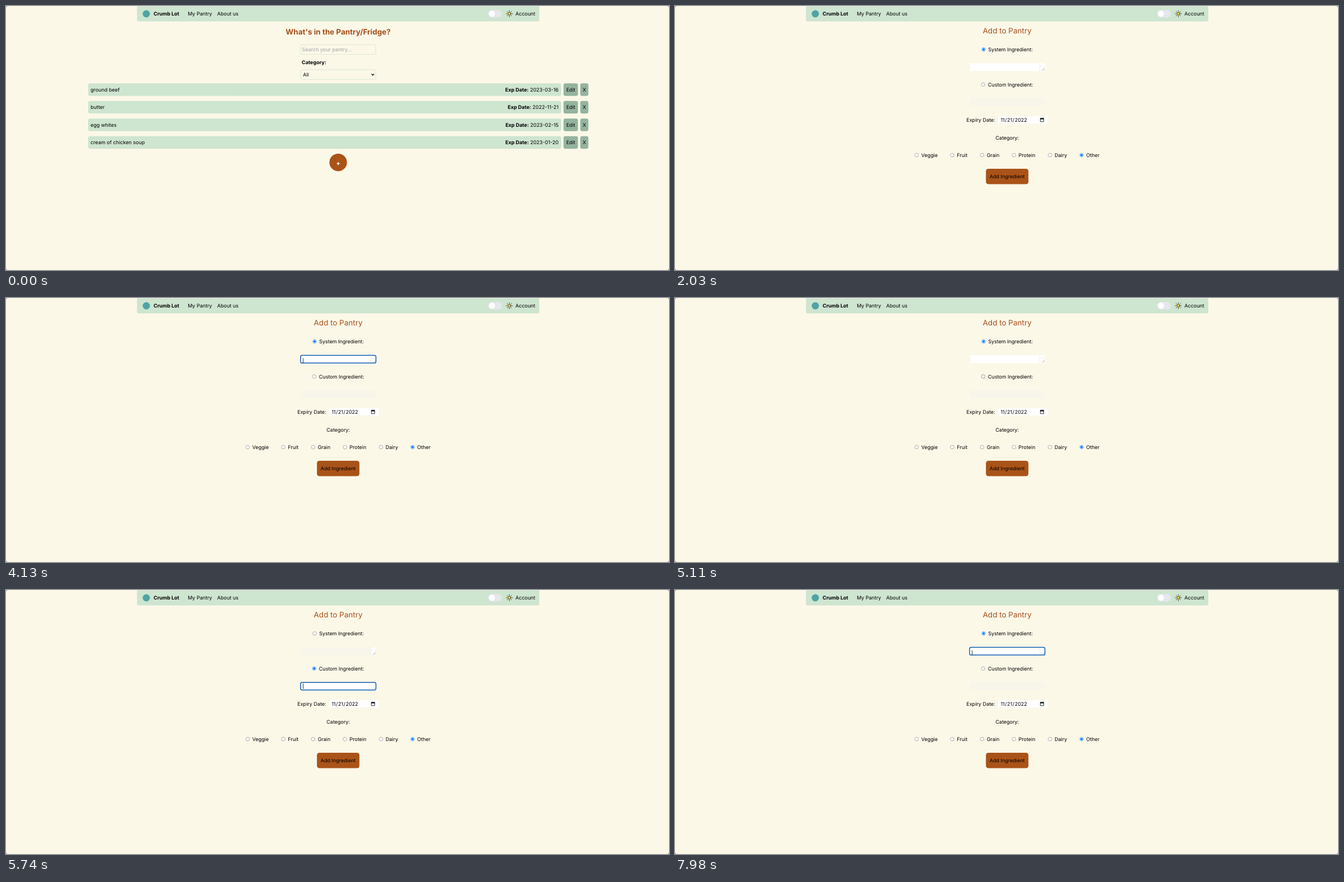
Animation, 1186 px wide and 472 px high, one loop 8000 ms. Source, as an HTML page:

```html
<!DOCTYPE html>
<html lang="en">
<head>
<meta charset="utf-8">
<title>Pantry</title>
<style>
  html, body { margin: 0; width: 100%; height: 100%; overflow: hidden; background: #fcf8e8; }
  svg { display: block; width: 1186px; height: 472px; }
  text { font: 400 9px Inter, sans-serif; text-rendering: geometricPrecision; white-space: pre; }
  .b { font-weight: 700; }
  .mid { text-anchor: middle; }
  .end { text-anchor: end; }
  .title { font-size: 13.5px; fill: #a64f1d; }
  .hint { fill: #9fa3a8; }
  .plus { font-size: 11.25px; fill: #fff; }
  .mint { fill: #cee5d0; }
  .sage { fill: #94b49f; }
  .rust { fill: #aa5319; }
  .field { fill: none; stroke: #cee5d0; }
  .off { fill: #f8f5ea; }
  .white { fill: #fff; }
  .ring { fill: #fff; stroke: #105db5; stroke-width: 1.5; }
  .line { fill: none; stroke: #000; }
</style>
</head>
<body>
<svg id="stage" viewBox="0 0 1186 472" xmlns="http://www.w3.org/2000/svg"></svg>
<script>
const LOOP = 8000;
const CAP = 3.27; // half the cap height of 9px text

const text = (x, cy, s, cls = '', attrs = '') =>
  `<text x="${x}" y="${cy + CAP}" class="${cls}" ${attrs}>${s}</text>`;
const title = (y, s, cls) => `<text x="594.2" y="${y}" class="title mid ${cls}">${s}</text>`;
const rect = (x, y, w, h, r, cls) =>
  `<rect x="${x}" y="${y}" width="${w}" height="${h}" rx="${r}" class="${cls}"/>`;
const circle = (x, y, r, attrs) => `<circle cx="${x}" cy="${y}" r="${r}" ${attrs}/>`;
const path = (d, attrs) => `<path d="${d}" ${attrs}/>`;

// A part of the picture that is visible only in the given time spans
const spans = [];
const during = (times, body) => `<g data-span="${spans.push(times) - 1}">${body}</g>`;

const radio = (x, y, color = '#767676', checked = false) =>
  circle(x, y, 3.3, `fill="#fff" stroke="${color}" stroke-width=".6"`) +
  (checked ? circle(x, y, 2.1, `fill="${color}"`) : '');
const checkedRadio = (x, y, color = '#0075ff') => radio(x, y, color, true);

function nav() {
  const rays = [...Array(8)].map((_, i) =>
    `<path d="M0-4.2V-5.6" transform="rotate(${i * 45})"/>`).join('');
  return path('M234.4.5H954V25.2a2.2 2.2 0 0 1-2.2 2.2H236.6a2.2 2.2 0 0 1-2.2-2.2Z', 'class="mint"') +
    circle(251, 14, 6.5, 'fill="#4fa3a5"') +
    text(264, 14.2, 'Crumb Lot', 'b') +
    text(325.2, 14.2, 'My Pantry') +
    text(377.8, 14.2, 'About us') +
    rect(862.5, 7, 24.75, 13.5, 6.75, '" fill="#e5e7eb') +
    circle(869.2, 13.75, 5.5, 'class="white"') +
    `<g transform="translate(900.4 13.8)" stroke="#2b2b20" stroke-width=".9" stroke-linecap="round">
      <circle r="2.6" fill="#f7d54a"/>${rays}</g>` +
    text(946.8, 14.2, 'Account', 'end');
}

function pantry() {
  const items = [
    ['ground beef', '2023-03-16'],
    ['butter', '2022-11-21'],
    ['egg whites', '2023-02-15'],
    ['cream of chicken soup', '2023-01-20'],
  ];
  const rows = items.map(([name, date], i) => {
    const y = 138.2 + i * 31.5, cy = y + 11.25;
    return rect(147, y, 846, 22.5, 3.4, 'mint') +
      rect(997.3, y, 25.8, 22.5, 3.4, 'sage') +
      rect(1027.3, y, 14.4, 22.5, 3.4, 'sage') +
      text(151.2, cy, name) +
      text(988.4, cy, `<tspan class="b">Exp Date:</tspan> ${date}`, 'end') +
      text(1010.2, cy, 'Edit', 'mid') +
      text(1034.5, cy, 'X', 'mid');
  }).join('');
  return title(51.4, "What's in the Pantry/Fridge?", 'b') +
    rect(527.2, 69.2, 134.3, 17.4, 2.2, 'field" stroke-width=".8') +
    text(529.6, 78, 'Search your pantry...', 'hint') +
    text(529, 100.5, 'Category:', 'b') +
    rect(527.2, 113.9, 134.3, 17.4, 2.2, 'field" stroke-width=".8') +
    text(531.3, 122.8, 'All') +
    path('M653.7 121.4l2.4 2.4 2.4-2.4', 'class="line" stroke-width="1.3"') +
    rows +
    circle(594.2, 279.7, 15.7, 'class="rust"') +
    '<text x="594.2" y="284.5" class="plus b mid">+</text>';
}

function form() {
  const sys = [552, 77.7], cus = [551.3, 140.4];
  const kinds = [
    [432.2, 'Veggie'], [496, 'Fruit'], [549.4, 'Grain'],
    [606.2, 'Protein'], [670.7, 'Dairy'], [727.3, 'Other'],
  ];
  const choices = kinds.map(([x, s]) =>
    (s === 'Other' ? checkedRadio : radio)(x, 266.6) + text(x + 8.3, 266.6, s)).join('');
  const grip = path('M652.5 102.7h9v13.2h-9z', 'fill="#fff"') +
    path('M652.6 102.7V116M652.6 107.3H661.6', 'fill="none" stroke="#e2e2e0" stroke-width=".6"') +
    path('M656.3 115.4l4.7-4.7M659 115.4l2-2', 'fill="none" stroke="#777" stroke-width=".6"');
  const caret = (y, h) => rect(531.1, y, .8, h, 0, '');

  return title(48.9, 'Add to Pantry', '') +
    text(560.2, 77.7, 'System Ingredient:') +
    text(559.8, 140.4, 'Custom Ingredient:') +

    rect(527.2, 102.4, 134.6, 13.9, 1, 'off') +
    rect(527.2, 165.2, 134.6, 13.6, 1, 'off') +
    during([[2030, 5180], [7700, LOOP]], rect(527.8, 102.4, 134, 13.9, 0, 'white')) +
    during([[5180, 7700]], rect(527.8, 165.2, 134, 13.6, 0, 'white')) +
    during([[3080, 5110], [7980, LOOP]], rect(527, 102.4, 134.7, 13.9, 2.6, 'ring')) +
    during([[5740, 7630]], rect(527, 165.3, 134.7, 13.4, 2.6, 'ring')) +
    during([[2030, 3080], [5110, 7980]], grip) +
    during([[3080, 5110], [7980, LOOP]],
      path('M652.6 104V115M652.6 107.3H660', 'fill="none" stroke="#e2e2e0" stroke-width=".6"') +
      path('M657.5 115l3-3', 'fill="none" stroke="#777" stroke-width=".5"')) +
    during([[3080, 3640], [4130, 4690], [7980, LOOP]], caret(108, 8)) +
    during([[5740, 6230], [6790, 7350]], caret(167, 10)) +

    during([[2030, 5180], [7770, LOOP]], checkedRadio(...sys)) +
    during([[5180, 6860]], radio(...sys)) +
    during([[6860, 7700]], radio(...sys, '#4f4f4f')) +
    during([[7700, 7770]], checkedRadio(...sys, '#005cc8')) +
    during([[2030, 4690], [7700, LOOP]], radio(...cus)) +
    during([[4690, 5180]], radio(...cus, '#4f4f4f')) +
    during([[5180, 5390]], checkedRadio(...cus, '#005cc8')) +
    during([[5390, 7700]], checkedRadio(...cus)) +

    text(521.3, 203.5, 'Expiry Date:') +
    rect(577.8, 196.8, 89, 13.4, 0, 'white') +
    text(582.4, 203.5, '11/21/2022', '', 'dx="0 0 .56 .56 0 .56 .56"') +
    path('M653.6 201.2h6v5.6h-6zM655 199.6v1.6M658.2 199.6v1.6', 'class="line" stroke-width=".8"') +
    path('M653.3 200.6h6.6v2h-6.6z', '') +
    text(594.2, 235.4, 'Category:', 'mid') +
    choices +
    rect(556.2, 291, 76, 27.5, 4.5, 'rust') +
    text(594.2, 304.8, 'Add Ingredient', 'mid');
}

const stage = document.getElementById('stage');
stage.innerHTML = nav() + during([[0, 2030]], pantry()) + during([[2030, LOOP]], form()) +
  path('M0 0h3q-3 0-3 3zM1186 0h-3q3 0 3 3zM0 472h3q-3 0-3-3zM1186 472h-3q3 0 3-3z', 'fill="#55534d"');

for (const el of stage.querySelectorAll('[data-span]')) {
  const times = spans[el.dataset.span];
  const lit = t => times.some(([from, to]) => t >= from && t < to) ? 1 : 0;
  const edges = [...new Set([0, ...times.flat(), LOOP])].sort((a, b) => a - b);
  el.animate(
    edges.map(t => ({ offset: t / LOOP, opacity: lit(t), easing: 'step-end' })),
    { duration: LOOP, iterations: Infinity }
  );
}
</script>
</body>
</html>
```
